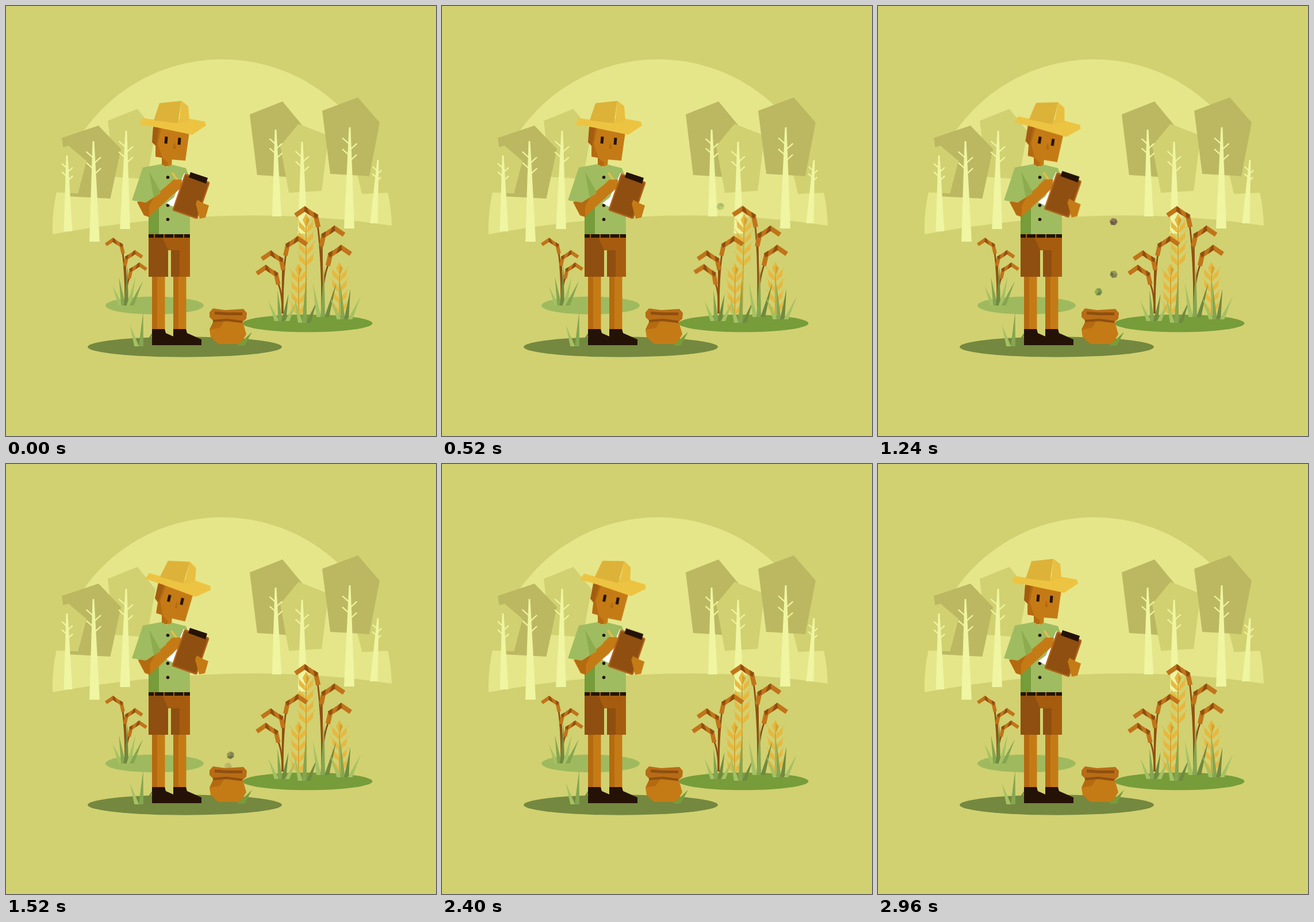
These frames come from a looping animation (748x748 px, 3000 ms). An HTML page:

```html
<!DOCTYPE html>
<html lang="en">
<head>
<meta charset="utf-8">
<title>Farmer in the field</title>
<style>
html, body { margin: 0; width: 100%; height: 100%; overflow: hidden; background: #d1d171; }
svg { display: block; width: 100%; height: 100%; }
.sway, .head, .board, .arm, .hand { animation: 3s cubic-bezier(.37, 0, .63, 1) infinite; }
.early { animation-name: early; }
.late { animation-name: late; }
.head { animation-name: nod; transform-origin: 279px 268px; }
.board { animation-name: shift; --to: translate(-1px, -4px); }
.arm { animation-name: shift; --to: translate(1.5px, -.5px); }
.hand { animation-name: write; }
.sx { animation: seedX 3s infinite; }
.sy { animation: seedY 3s infinite; }
.spin { animation: spin 3s linear infinite; }
@keyframes early { 0%, 1%, 26%, 100% { transform: rotate(0); } 8.7% { transform: rotate(var(--a)); } }
@keyframes late { 0%, 2.7%, 28.7%, 100% { transform: rotate(0); } 12.7% { transform: rotate(var(--a)); } }
@keyframes nod { 0%, 32%, 93.3%, 100% { transform: rotate(0); } 50%, 74.7% { transform: rotate(8.6deg); } }
@keyframes shift { 0%, 32%, 93.3%, 100% { transform: translate(0, 0); } 50%, 74.7% { transform: var(--to); } }
@keyframes write {
  0%, 32%, 93.3%, 100% { transform: translate(0, 0); }
  38%, 48%, 58%, 68% { transform: translate(-2.5px, 1px); }
  43%, 53%, 63%, 74% { transform: translate(-1px, -1px); }
}
@keyframes seedX { 0% { transform: translateX(var(--x0)); } 28%, 100% { transform: translateX(var(--x1)); } }
@keyframes seedY { 0% { transform: translateY(var(--y0)); } 28%, 100% { transform: translateY(var(--y1)); } }
@keyframes spin {
  0% { transform: rotate(0); opacity: 0; }
  3%, 27.5% { opacity: 1; }
  28%, 100% { transform: rotate(-260deg); opacity: 0; }
}
</style>
</head>
<body>
<svg id="stage" viewBox="0 0 748 748"></svg>
<script>
const C = {
  bg: '#d1d171', sun: '#e5e68a', olive: '#bcb862', trunk: '#eff5a1',
  rust: '#c17419', bark: '#8f4f10', wheat: '#e7b83f', gold: '#d6a32f',
  skin: '#c57b15', shade: '#b56a10', ink: '#251207', sack: '#b86c15',
  shirt: '#a0bc60', fold: '#779c3a', crease: '#8cac4d', shorts: '#a65c0e',
  grass: ['#a5c163', '#85a650', '#70893f']
};

const poly = (fill, pts) => `<polygon fill="${fill}" points="${pts}"/>`;
const rect = (fill, x, y, w, h) => `<rect fill="${fill}" x="${x}" y="${y}" width="${w}" height="${h}"/>`;
const oval = (fill, x, y, rx, ry) => `<ellipse fill="${fill}" cx="${x}" cy="${y}" rx="${rx}" ry="${ry}"/>`;
const line = (color, w, d) => `<path d="${d}" fill="none" stroke="${color}" stroke-width="${w}"/>`;
const group = (attrs, ...parts) => `<g ${attrs}>${parts.join('')}</g>`;
const at = (x, y, sx, sy, ...parts) =>
  group(`transform="translate(${x} ${y}) scale(${sx} ${sy})"`, ...parts);
const sway = (kind, deg, x, y, ...parts) =>
  group(`class="sway ${kind}" style="--a:${deg}deg;transform-origin:${x}px ${y}px"`, ...parts);
const times = (n, fn) => Array.from({ length: n }, (_, i) => fn(i)).join('');

let state = 7;
const rnd = () => (state = state * 16807 % 2147483647) / 2147483647;

// All crowns share one outline; a negative width mirrors it
const crown = (fill, x, y, w, h) => at(x, y, w, h, poly(fill, '0,.17 .62,0 1,.32 .82,1 .14,.97'));

// Tapering trunk with twigs on alternating sides
function tree(x, top, base, lean = 0) {
  const h = base - top, w = 2.5 + h * .037, foot = x + lean;
  const twigs = times(4, i => {
    const y = h * (.17 + .055 * i), side = i % 2 ? 1 : -1;
    return line(C.trunk, 2.2, `M${x + lean * y / h} ${top + y}l${side * h * .072} ${-h * .065}`);
  });
  return poly(C.trunk, `${x - 1.4},${top} ${x + 1.4},${top} ${foot + w},${base} ${foot - w},${base}`) + twigs;
}

// Grain head: a thick stalk end that bends over and droops
const grain = (x, y, dir, s) => at(x, y, dir * s, s,
  line(C.rust, 8, 'M-1 23L3 5L22 -8L38 3'),
  poly(C.bark, '18,-10 22,-13 23,-4 13,3'),
  poly(C.bark, '-1,2 7,-3 6,6 2,9'));

// Three grain heads on bending stalks; the head numbered `loose` sways
function reed(x, y, dir, k, s, loose, kind, deg) {
  return times(3, i => {
    const hx = x + dir * k * (1.5 * i * i + 3 * i - 5), hy = y - k * (105 - 21.5 * i);
    const part = line(C.bark, 2.8, `M${x} ${y}Q${x} ${(y + hy) / 2} ${hx} ${hy + 20 * s}`) +
      grain(hx, hy, i ? dir : -dir, s);
    return i === loose ? sway(kind, deg, x, y, part) : part;
  });
}

function wheat(x, top, base, pairs) {
  const pair = (y, m) =>
    line(C.wheat, 1.1, `M${4 * m} ${y + 9}L${16 * m} ${y - 5}`) +
    poly(C.wheat, `${m},${y + 20} ${2 * m},${y + 10} ${13 * m},${y} ${12 * m},${y + 10}`);
  return line(C.gold, 2, `M${x} ${top + 12}V${base}`) + at(x, top, 1, 1,
    times(pairs, i => pair(14 + 19 * i, -1) + pair(14 + 19 * i, 1)),
    poly(C.wheat, '0,0 6,11 0,25 -6,11'), poly(C.gold, '0,6 6,11 0,25'));
}

// Fan of grass blades, tallest in the middle
const clump = (x, y, n, h, spread) => times(n, i => {
  const u = n > 1 ? 2 * i / (n - 1) - 1 : 1, foot = x + u * spread * .35;
  const tip = y - h * (1 - .4 * Math.abs(u)) * (.85 + .3 * rnd());
  return poly(C.grass[i % 3], `${x + u * spread + 4 * rnd()},${tip} ${foot + 4},${y} ${foot - 4},${y}`);
});

// Quadratic flight: each axis becomes one cubic-bezier timing curve
function seed(start, from, bend, color) {
  const to = [386, 529], delay = `animation-delay:${start - 3000}ms`;
  const axis = (name, i, ...inner) => {
    const q = (bend[i] - from[i]) / (to[i] - from[i]);
    const ease = `cubic-bezier(.3333,${2 * q / 3},.6667,${(1 + 2 * q) / 3})`;
    return group(`class="s${name}" style="--${name}0:${from[i]}px;--${name}1:${to[i]}px;` +
      `${delay};animation-timing-function:${ease}"`, ...inner);
  };
  const corner = i => `${7 * Math.cos(i * Math.PI / 3)},${6.5 * Math.sin(i * Math.PI / 3)}`;
  const facet = i => poly(color, `0,0 ${corner(2 * i)} ${corner(2 * i + 1)} ${corner(2 * i + 2)}`) +
    group(`opacity="${.12 * i}"`, poly('#000', `0,0 ${corner(2 * i)} ${corner(2 * i + 1)} ${corner(2 * i + 2)}`));
  return axis('x', 0, axis('y', 1, group(`class="spin" style="${delay}"`, times(3, facet))));
}

const backdrop = [
  `<path fill="${C.sun}" d="M81 397A295.1 295.1 0 1 1 671 382Q400 340 81 397Z"/>`,
  crown(C.bg, 690, 237, -86, 90),
  crown(C.bg, 177, 179, 83, 122),
  crown(C.olive, 97, 208, 103, 127),
  crown(C.bg, 58, 243, 82, 83),
  crown(C.olive, 424, 166, 92, 132),
  crown(C.bg, 561, 205, -84, 120),
  crown(C.olive, 550, 159, 100, 137),
  tree(106, 260, 392, 2), tree(152, 235, 410, 2), tree(209, 217, 388, -2), tree(469, 215, 366, 2),
  tree(515, 236, 396, 1), tree(598, 211, 387, -1), tree(647, 268, 378, -7),
  oval('#9fba5e', 258.5, 521, 85.5, 15.5),
  oval(C.fold, 524.5, 552, 113, 15.3),
  oval('#74883f', 311, 593, 169, 17.7)
];

const plants = [
  reed(208, 518, 1, 1, .77),
  clump(209, 521, 5, 66, 27),
  sway('early', 2.6, 519, 540, wheat(522, 361, 540, 4)),
  wheat(580, 445, 543, 4),
  reed(481, 535, -1, 1.17, .96, 2, 'late', 3.2),
  sway('late', .8, 510, 545, wheat(509, 447, 543, 4)),
  reed(550, 525, 1, 1.56, 1.02, 0, 'early', 2.1),
  clump(480, 548, 4, 56, 26), clump(519, 551, 3, 72, 20),
  clump(551, 541, 3, 88, 20), clump(589, 545, 4, 68, 27),
  clump(235, 592, 3, 56, 22)
];

const seeds = [
  seed(480, [497, 348], [365, 352], '#8fae55'),
  seed(685, [520, 350], [405, 231], '#8d7659'),
  seed(825, [467, 416], [393, 462], '#92965a')
];

const bag = [
  poly(C.skin, '362,546 354,563 356,576 369,588 408,588 418,571 411,546'),
  poly(C.shade, '362,546 354,563 372,560 379,549 411,553'),
  poly(C.sack, '354,533 360,526 381,529 413,527 419,534 418,544 411,550 385,546 360,547 354,541'),
  line(C.bark, 5, 'M363 534L385 535.5H411'),
  line(C.bark, 4, 'M360 548L384 546L411 549.5'),
  poly(C.fold, '428,567 415,591 402,591')
];

const legs = [254, 291].map(x =>
  rect(C.skin, x, 465, 22.5, 100) + rect(C.shade, x, 465, 9, 100) +
  at(x, 562, 1, 1, poly(C.ink, '0,0 22,0 24,7 49,18 49,28 0,28')));
const trousers = [
  poly(C.bark, '248,402 320,402 320,471 287,471 287,425 282,425 282,471 248,471'),
  poly(C.shorts, '272,402 320,402 320,471 302,471 302,425 282,425')
];

const torso = [
  poly(C.skin, '271,258 289,262 288,279 271,279'),
  poly(C.shade, '271,258 287,266 279,279 271,276'),
  poly(C.shirt, '238,281 270,275 280,280 289,276 313,282 320,300 320,397 248,397 248,300'),
  poly(C.fold, '248,362 266,346 266,397 248,397'),
  rect(C.ink, 248, 397, 72, 6),
  times(4, i => rect(C.shorts, 257 + 17 * i, 397, 2, 6)),
  times(4, i => oval(C.ink, 281.5, 298 + 24.4 * i, 2.8, 2.8))
];

const eye = (x, y) => at(x, y, 1, 1, poly(C.ink, '-2,-6 3,-5.5 2,6.5 -3,6'));
const face = [
  poly(C.skin, '261,205 320,212 312,269 287,267 284,274 272,264 260,262'),
  poly(C.shade, '261,208 270,213 264,240 272,264 260,262'),
  poly('#a35c10', '256,209 266,211 261,244 254,237'),
  eye(278.5, 233), eye(301.5, 235),
  poly(C.shade, '293,236 296,249 290,248'),
  poly('#edc442', '232,206 238,195 260,198 318,196 346,201 348,208 324,224 262,211'),
  poly('#ddb239', '257,199 267,169 305,165 299,204'),
  poly('#e8bf40', '305,165 317,174 319,199 301,204')
];

const arms = [
  group('class="board"', poly('#fff', '310,291 314,293 296,352 279,343 292,333')),
  group('class="arm"',
    poly(C.skin, '228,341 243,342 288,306 301,306 300,319 249,367 240,364'),
    poly(C.shade, '228,341 258,331 249,349 249,367 240,364')),
  group('class="hand"',
    line('#e9bd4a', 3.4, 'M289 290L300 305'),
    poly(C.skin, '280,313 291,302 306,302 305,316 293,326')),
  poly(C.shirt, '238,281 249,280 268,326 243,342 219,338'),
  poly(C.crease, '249,288 269,324 257,333'),
  group('class="board"',
    `<rect x="-22" y="-33" width="44" height="66" rx="2" transform="translate(322 331) rotate(19)" fill="${C.bark}" stroke="#b0631b" stroke-width="2.5"/>`,
    poly(C.ink, '321,289 351,299 348,309 318,298'),
    poly(C.skin, '330,344 333,337 343,343 353,347 347,368 337,370'))
];

document.getElementById('stage').innerHTML = [
  ...backdrop, ...plants, ...legs, ...trousers, ...seeds, ...bag, ...torso,
  group('class="head"', ...face), ...arms
].join('');
</script>
</body>
</html>
```
